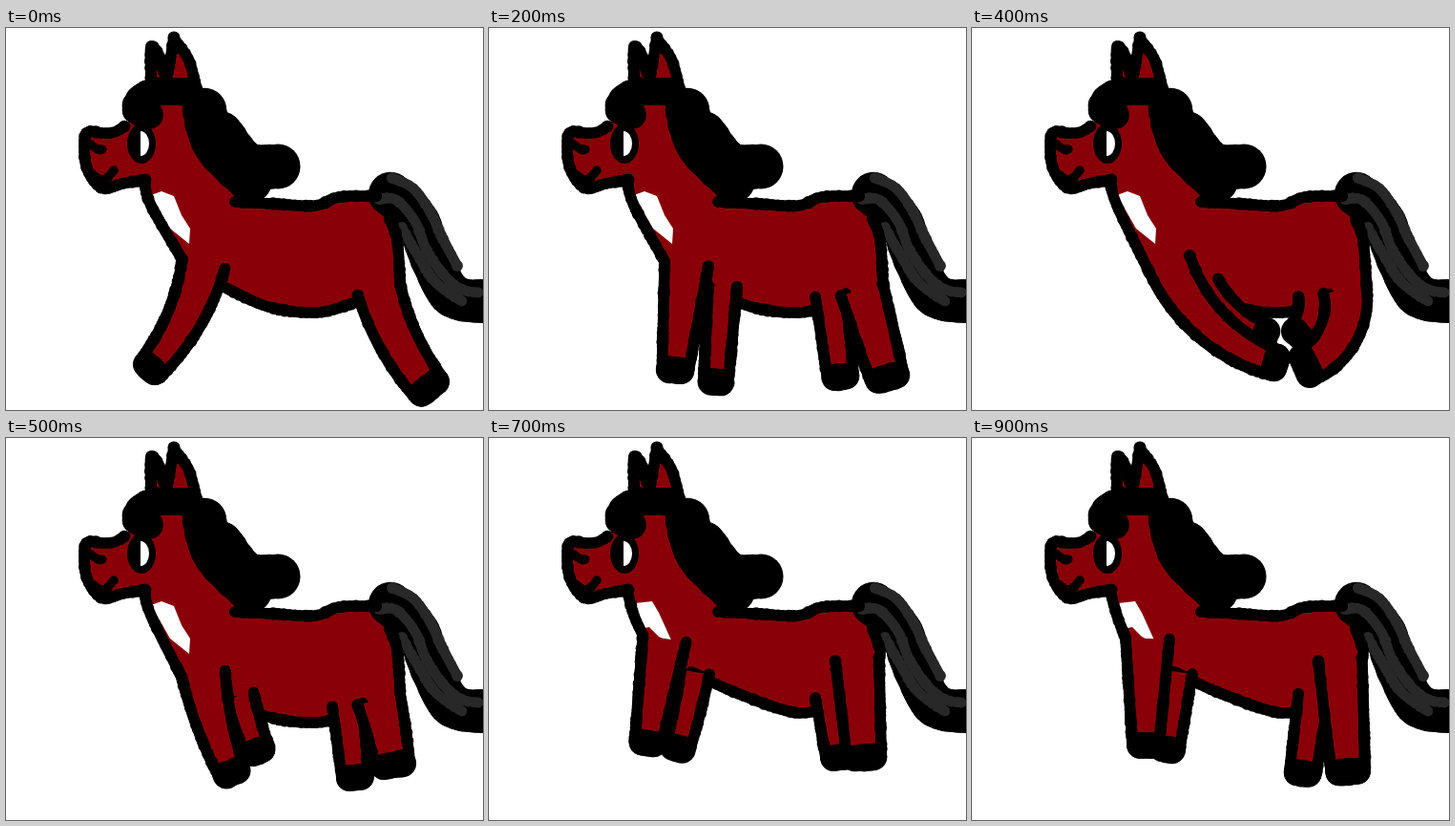
These frames come from a looping animation (500 by 400 pixels, 1 s). An HTML page with a canvas:

```html
<!DOCTYPE html>
<html lang="en">
<head>
<meta charset="utf-8">
<title>Galloping horse</title>
<style>
html, body { margin: 0; width: 100%; height: 100%; overflow: hidden; background: #fff; }
canvas { display: block; }
</style>
</head>
<body>
<canvas id="stage" width="500" height="400"></canvas>
<script>
const ctx = document.getElementById('stage').getContext('2d');
const RED = '#8a0008', INK = '#000', GREY = '#282828', WHITE = '#fff';
const STEP = 100;

// Each hip slides from low to high with the lift of its end of the body
const slots = {
  nearFront: { end: 'front', low: [207, 247], high: [184, 210], top: 46, foot: 28 },
  farFront: { end: 'front', low: [245, 270], high: [216, 245], top: 30, foot: 26 },
  nearHind: { end: 'hind', low: [391, 274], high: [386, 232], top: 46, foot: 36 },
  farHind: { end: 'hind', low: [358, 280], high: [358, 270], top: 32, foot: 28 }
};

// A leg is an arc: heading at the hip (degrees, 0 = down), bend, length
const pose = (front, hind, nearFront, farFront, nearHind, farHind) =>
  ({ front, hind, nearFront, farFront, nearHind, farHind });

const reach = pose(0, 0, [-12, -30, 124], null, [15, 24, 116], null);
const stand = pose(0, 0, [-6, 0, 112], [-4, 0, 101], [16, 0, 96], [7, 0, 86]);
const gather = pose(0, 0, [22, 50, 157], [30, 40, 83], [10, -75, 96], [5, -50, 46]);
const land = pose(0, 0, [9, 14, 108], [14, 8, 61], [14, -4, 70], [6, 0, 76]);
const leap = pose(1, 0, [2, -70, 136], [-12, -44, 115], [27, 40, 101], [26, 13, 99]);
const drop = pose(1, 1, [-9, 0, 111], [-10, -6, 82], [4, 0, 103], [8, 0, 65]);
const brace = pose(1, 1, [-1, 0, 112], [-8, 0, 82], [4, 0, 118], [-8, 0, 82]);

const mix = (a, b, t) => a + (b - a) * t;
const mixAll = (a, b, t) => a.map((v, i) => mix(v, b[i], t));

function between(a, b) {
  const out = {};
  for (const k in a) {
    out[k] = !Array.isArray(b[k]) ? mix(a[k], b[k], 0.5)
      : a[k] ? mixAll(a[k], b[k], 0.5) : b[k];
  }
  return out;
}

const cycle = [
  reach, between(reach, stand), stand, between(stand, gather), gather,
  land, leap, drop, between(drop, brace), brace
];

const pairs = a => {
  const p = [];
  for (let i = 0; i < a.length; i += 2) p.push([a[i], a[i + 1]]);
  return p;
};

// Catmull-Rom samples through the given points
function curve(a) {
  const p = pairs(a), out = [p[0]];
  for (let i = 0; i < p.length - 1; i++) {
    const q0 = p[i - 1] || p[i], q1 = p[i], q2 = p[i + 1], q3 = p[i + 2] || q2;
    const n = Math.max(2, Math.ceil(Math.hypot(q2[0] - q1[0], q2[1] - q1[1]) / 6));
    for (let k = 1; k <= n; k++) {
      const t = k / n;
      out.push([0, 1].map(d => 0.5 * (2 * q1[d] + (q2[d] - q0[d]) * t +
        (2 * q0[d] - 5 * q1[d] + 4 * q2[d] - q3[d]) * t * t +
        (3 * q1[d] - q0[d] - 3 * q2[d] + q3[d]) * t * t * t)));
    }
  }
  return out;
}

function trace(pts) {
  ctx.beginPath();
  pts.forEach(([x, y]) => ctx.lineTo(x, y));
}

function fill(pts, color) {
  trace(pts);
  ctx.closePath();
  ctx.fillStyle = color;
  ctx.fill();
}

// Brush stroke with a slightly lumpy edge
function brush(a, width = 12, color = INK) {
  const pts = curve(a);
  trace(pts);
  ctx.lineWidth = width - 0.5;
  ctx.strokeStyle = ctx.fillStyle = color;
  ctx.stroke();
  for (const [x, y] of pts) {
    const h = Math.sin(x * 12.99 + y * 78.23) * 43758.5;
    ctx.beginPath();
    ctx.arc(x, y, width / 2 + (h - Math.floor(h)) * 1.3 - 0.6, 0, 7);
    ctx.fill();
  }
}

// Both edges of a tapered, bent leg and the line across its hoof
function limb(p, name) {
  const { end, low, high, top, foot } = slots[name];
  const [swing, bend, length] = p[name];
  const n = 8, left = [], right = [];
  let [x, y] = mixAll(low, high, p[end]), hoof;
  for (let i = 0; i <= n; i++) {
    const angle = (swing + bend * i / n) * Math.PI / 180;
    const mid = angle + bend * Math.PI / 360 / n;
    const c = Math.cos(angle), s = Math.sin(angle);
    const w = mix(top, foot, i / n) / 2, h = foot / 2 - 8;
    left.push([x - c * w, y + s * w]);
    right.push([x + c * w, y - s * w]);
    hoof = [x - c * h, y + s * h, x + c * h, y - s * h];
    x += Math.sin(mid) * length / n;
    y += Math.cos(mid) * length / n;
  }
  return { left, right, hoof };
}

function drawLimb({ left, right, hoof }) {
  fill([...left, ...right.slice().reverse()], RED);
  brush(left.flat());
  brush(right.flat());
  brush(hoof, 28);
}

function tail() {
  brush([403,174, 430,200, 446,241, 469,281, 512,286], 45);
  brush([405,157, 427,168, 445,193, 456,217, 473,249], 11, GREY);
  brush([391,179, 409,180, 429,203, 441,233, 461,261, 478,274, 495,277], 11, GREY);
  brush([415,209, 431,237, 450,266, 478,286], 11, GREY);
}

function head() {
  fill(pairs([151,22, 165,48, 176,14, 191,32, 200,62, 150,60]), RED);
  brush([152,52, 152,19, 161,30, 165,46]);
  brush([168,56, 171,40, 176,10]);
  brush([178,15, 191,32, 199,60]);

  // Mane and forelock
  brush([208,86, 219,122, 256,160], 46);
  brush([225,110, 252,142, 285,145], 46);
  brush([192,67, 155,67, 140,75, 136,86, 150,91], 29);

  // Muzzle
  brush([124,103, 114,109, 100,110, 84,110, 83,140, 92,160, 104,168, 122,163, 146,159]);
  brush([89,122, 96,127, 101,127], 9);
  brush([92,154, 103,159, 113,149], 9);

  ctx.fillStyle = INK;
  ctx.beginPath();
  ctx.ellipse(142, 121, 15, 21, 0, 0, 7);
  ctx.fill();
  ctx.fillStyle = WHITE;
  ctx.beginPath();
  ctx.ellipse(141, 121, 9, 13, 0, -Math.PI / 2, Math.PI / 2);
  ctx.fill();
}

function draw(p) {
  const near = limb(p, 'nearFront'), hind = limb(p, 'nearHind');
  const shoulder = near.left[0], rump = hind.right[0];
  const belly = mixAll([226,270, 275,292, 325,298, 362,289],
    [212,245, 262,268, 325,288, 364,276], p.front);
  const chest = p.front
    ? [153,173, 171,171, 178,183, 193,216, 178,208, 168,198, 158,200]
    : [152,175, 163,171, 176,176, 184,196, 193,210, 192,226, 172,210];

  fill(pairs([0,0, 500,0, 500,400, 0,400]), WHITE);
  ctx.lineCap = ctx.lineJoin = 'round';
  fill(pairs([122,105, 85,112, 83,140, 100,167, 145,160, 152,186, ...shoulder, ...belly,
    ...rump, 414,246, 410,222, 402,195, 385,174, 350,178, 325,185, 250,180, 215,130, 200,75, 150,75]), RED);
  fill(pairs(chest), WHITE);

  tail();
  brush([402,200, 410,222, ...rump]);
  brush([240,182, 280,184, 324,186, 349,177, 388,176]);
  brush([145,161, 152,186, ...shoulder]);
  brush(belly);
  for (const name of ['farFront', 'farHind']) if (p[name]) drawLimb(limb(p, name));
  drawLimb(near);
  drawLimb(hind);
  head();
}

let shown = -1;
function tick() {
  const step = Math.floor(performance.now() / STEP) % cycle.length;
  if (step !== shown) draw(cycle[shown = step]);
  requestAnimationFrame(tick);
}
tick();
</script>
</body>
</html>
```
